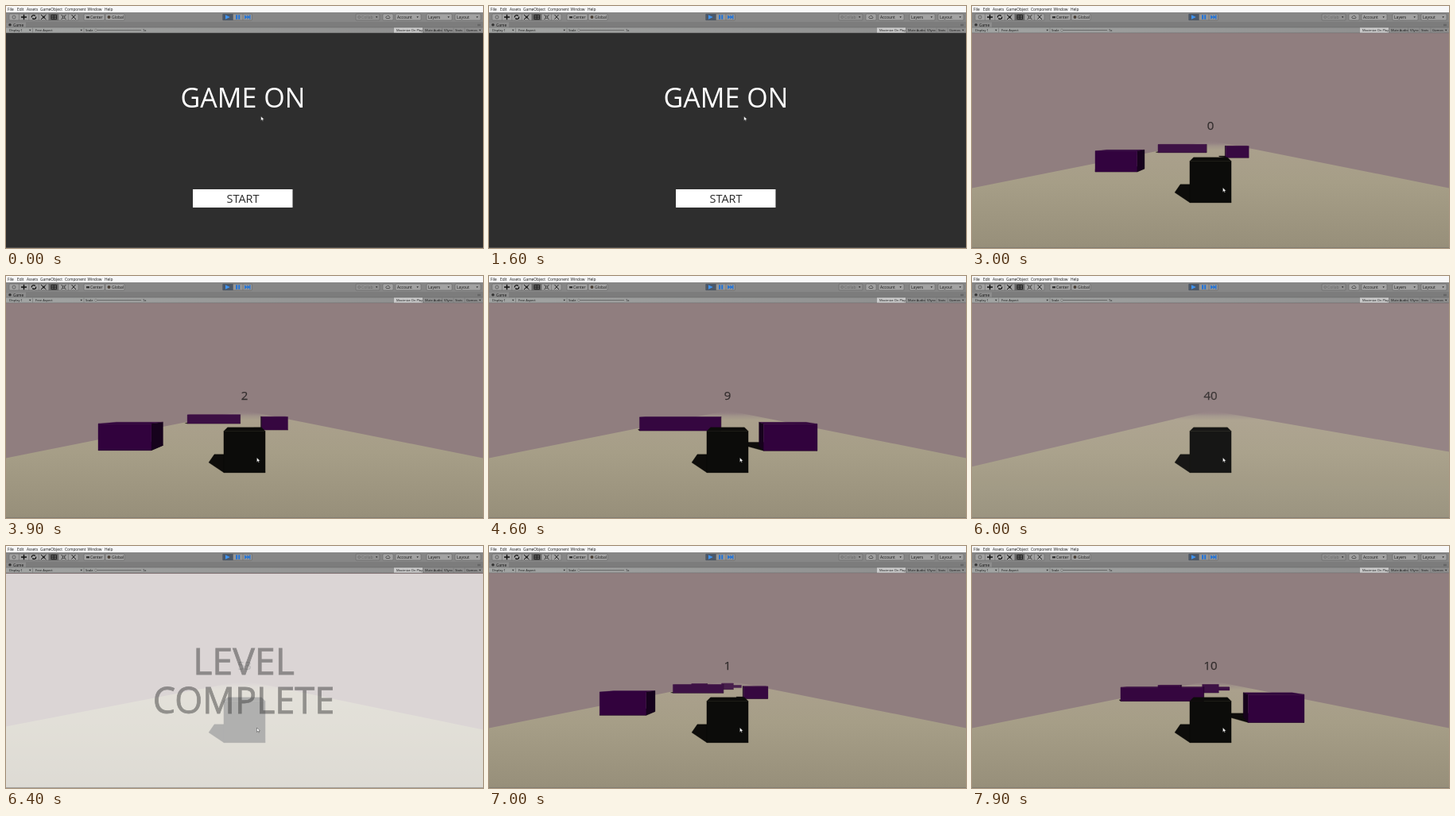
Recreate the animation shown at these times as an HTML page. Size 600 px wide and 305 px high, loop 8000 ms.

```html
<!DOCTYPE html>
<html lang="en">
<head>
<meta charset="utf-8">
<title>Cube runner</title>
<style>
  html, body { margin: 0; width: 100%; height: 100%; overflow: hidden; background: #2e2e2e; }
  svg { display: block; width: 100vw; height: 100vh; }
  text { font-family: "Open Sans", "Noto Sans", sans-serif; }
</style>
</head>
<body>
<svg viewBox="0 0 600 305">
  <defs>
    <linearGradient id="sand" gradientUnits="userSpaceOnUse" x1="0" y1="169.5" x2="0" y2="305">
      <stop offset="0" stop-color="#907e7f"/>
      <stop offset=".025" stop-color="#948283"/>
      <stop offset=".05" stop-color="#a09389"/>
      <stop offset=".09" stop-color="#aaa08c"/>
      <stop offset=".4" stop-color="#a69e87"/>
      <stop offset="1" stop-color="#978f7a"/>
    </linearGradient>
    <linearGradient id="bar">
      <stop offset="0" stop-color="#a2a4a3"/>
      <stop offset="1" stop-color="#8c8c8c"/>
    </linearGradient>
    <clipPath id="view"><rect y="34" width="600" height="271"/></clipPath>
  </defs>

  <g id="menu">
    <rect y="34" width="600" height="271" fill="#2e2e2e"/>
    <text x="298" y="128.3" font-size="34" fill="#fff" text-anchor="middle">GAME ON</text>
    <rect x="235" y="231" width="125.5" height="23" fill="#fff"/>
    <text x="298" y="248" font-size="14.5" fill="#2b2b2b" text-anchor="middle">START</text>
  </g>

  <g id="game" clip-path="url(#view)">
    <rect y="34" width="600" height="271" fill="#907e7f"/>
    <path id="ground" fill="url(#sand)"/>
    <g id="solids"></g>
    <text id="score" x="300" y="156" font-size="15" fill="#322d2d" stroke="#322d2d" stroke-width=".25" text-anchor="middle"></text>
    <rect id="veil" y="35" width="600" height="270" fill="#fff"/>
    <g id="done" fill="#323232" stroke="#323232" stroke-width=".8" text-anchor="middle">
      <text x="299" y="161.7" font-size="46.5">LEVEL</text>
      <text x="299" y="210.7" font-size="45">COMPLETE</text>
    </g>
  </g>

  <path d="M0 304.5H600" stroke="#6c6c6c" opacity=".5"/>
  <g id="chrome"></g>
  <path id="cursor" d="M0 0V5.5L1.3 4.3 2.2 6.2 3 5.8 2.2 4H4Z" fill="#fff" stroke="#222" stroke-width=".4"/>
</svg>

<script>
const $ = id => document.getElementById(id);
const LOOP = 8000, LEVEL_1 = 2800, LEVEL_2 = 6600, FADE = 5900;
const FOCAL = 234.7, HORIZON = 169.5, EYE = 2, FLOOR = 0.5, NEAR = 0.3;
const SKY = [144, 126, 127];
const SHADOW = { x: -0.53, z: 0.87 };

const clamp = (v, lo = 0, hi = 1) => Math.min(hi, Math.max(lo, v));
const smooth = u => { u = clamp(u); return u * u * (3 - 2 * u); };
const ease = (t, from, to) => smooth((t - from) / (to - from));

// ---- editor window ----
function buildChrome() {
  const rect = (x, y, w, h, fill, extra = '') =>
    `<rect x="${x}" y="${y}" width="${w}" height="${h}" fill="${fill}" ${extra}/>`;
  const label = (x, y, size, text, fill = '#141414') =>
    `<text x="${x}" y="${y}" font-size="${size}" fill="${fill}">${text}</text>`;
  const line = (d, color = '#1c1c1c', width = 1) =>
    `<path d="${d}" fill="none" stroke="${color}" stroke-width="${width}"/>`;
  const shape = (d, fill = '#222') => `<path d="${d}" fill="${fill}"/>`;
  const arrow = (x, y) => shape(`M${x} ${y}h2.4l-1.2 1.6z`);
  const button = (x, w, fill = '#a2a2a2') =>
    rect(x, 10, w, 8, fill, 'rx="1.2" stroke="#5c5c5c" stroke-width=".5"');

  let out = rect(0, 0, 600, 8, '#f8f8f8') + rect(0, 8, 600, 12, '#868686') +
    rect(0, 20, 600, 7, '#7c7c7c') + rect(0, 20.5, 25, 6.5, '#8c8c8c') +
    rect(0, 27, 600, 7, 'url(#bar)') + line('M0 27H600M0 33.8H600', '#666', 0.5);

  [[2, 'File'], [14, 'Edit'], [26, 'Assets'], [43, 'GameObject'], [74, 'Component'],
   [102.5, 'Window'], [124, 'Help']].forEach(([x, s]) => out += label(x, 5.8, 4.8, s));

  out += button(4, 87);
  for (let i = 1; i < 7; i++) out += line(`M${4 + i * 12.4} 10v8`, '#5c5c5c', 0.5);
  out += rect(54, 10, 12, 8, '#666') +
    `<circle cx="10" cy="14" r="2" fill="none" stroke="#555" stroke-width=".8"/>` +
    line('M19 14h7M22.5 10.8v6.4', '#111', 1.4) +
    line('M32.3 14.5a2.5 2.5 0 0 1 4.4-2M37.7 13.5a2.5 2.5 0 0 1-4.4 2', '#111', 1.2) +
    line('M44 11l6.500 6M50.5 11l-6.500 6', '#111', 1) + rect(45.9, 12.7, 2.8, 2.6, '#222') +
    line('M57 11.3h6.500v5.4h-6.500zM57 14h6.5M60.2 11.3v5.4', '#111', 0.8) +
    line('M69.5 11l6 6M75.5 11l-6 6', '#222', 0.9) +
    `<circle cx="72.5" cy="14" r="1.4" fill="#a2a2a2" stroke="#222" stroke-width=".7"/>` +
    line('M82.5 11l5.500 6M87.5 11l-5 5.5', '#222', 1);

  out += button(98, 26) + button(125, 24) + rect(101, 13, 4, 2.4, '#333') +
    `<circle cx="129.5" cy="14" r="2" fill="#4a4038"/>` +
    label(106, 15.8, 5, 'Center') + label(133, 15.8, 5, 'Global');

  out += button(272.5, 37, '#959595') + rect(272.5, 10, 13, 8, '#4c5868') +
    line('M285.5 10v8M298 10v8', '#5c5c5c', 0.5) +
    shape('M276 11.2l5.800 2.800-5.800 2.800z', '#3f93f0') +
    shape('M289.2 11.2h1.900v5.600h-1.900zM292.3 11.2h1.900v5.600h-1.900z', '#1c72dc') +
    shape('M300.2 11.2l3.200 2.800-3.200 2.800zM303.4 11.2l3.200 2.800-3.200 2.800zM306.2 11.2h1.300v5.600h-1.300z', '#1c72dc');

  out += button(440, 30, '#909090') + label(447, 15.8, 5, 'Collab', '#666') + arrow(465, 13.3) +
    `<circle cx="444.3" cy="14" r="1.5" fill="none" stroke="#666" stroke-width=".7"/>` +
    button(474, 13) + line('M478.5 15.5a1.2 1.2 0 0 1 .5-2.3a1.8 1.8 0 0 1 3.3.4a1 1 0 0 1 0 1.9z', '#333', 0.7) +
    button(490, 32) + label(492, 15.8, 5, 'Account') + arrow(516.5, 13.3) +
    button(529, 32) + label(531, 15.8, 5, 'Layers') + arrow(555.5, 13.3) +
    button(565, 32) + label(567, 15.8, 5, 'Layout') + arrow(591.5, 13.3);

  out += `<circle cx="5" cy="23.8" r="1.8" fill="#333"/>` + label(9, 25.6, 4.7, 'Game') +
    line('M593 23.3h4M593 24.7h4', '#444', 0.5);

  out += rect(488, 27.4, 36, 6.2, '#cacaca') +
    line('M33.5 27.5v6M98 27.5v6M524.5 27.5v6M548.5 27.5v6M563 27.5v6M577 27.5v6', '#6c6c6c', 0.5) +
    line('M112 30.5H170', '#555', 0.7) +
    `<circle cx="113" cy="30.5" r="1.3" fill="#bbb" stroke="#444" stroke-width=".4"/>`;
  [[4, 'Display 1'], [37, 'Free Aspect'], [100, 'Scale'], [172, '1x'], [491, 'Maximize On Play'],
   [527, 'Mute Audio'], [551, 'VSync'], [565, 'Stats'], [579, 'Gizmos']]
    .forEach(([x, s]) => out += label(x, 31.9, 4, s));
  out += arrow(29, 29.8) + arrow(93.5, 29.8) + arrow(595, 29.8);
  $('chrome').innerHTML = out;
}

// ---- 3D scene ----
const block = (x0, x1, z, y0 = FLOOR, y1 = 1.5) => ({ x0, x1, y0, y1, z0: z, z1: z + 1,
  front: [48, 0, 60], side: [20, 0, 27] });
const FIRST = [block(-5.5, -3.5, 8.9), block(-6.5, -0.5, 23.1), block(1.34, 3.34, 16.25)];
const SECOND = [...FIRST, block(-1, 1, 32.3), block(-5.35, -3.1, 28.6), block(1, 2.42, 33.3, 0.74, 1.14)];
const PLAYER = { ...block(-0.5, 0.5, 4.5), front: [11, 11, 9] };

function project(x, y, z) {
  const k = FOCAL / Math.max(z, NEAR);
  return `${(300 + x * k).toFixed(2)},${(HORIZON + (EYE - y) * k).toFixed(2)}`;
}

// The thin stroke closes the seams between faces of one colour.
function polygon(points, color, depth) {
  const fog = 1 - Math.exp(-((depth * 0.017) ** 2));
  const rgb = `rgb(${color.map((c, i) => Math.round(c + (SKY[i] - c) * fog))})`;
  return `<polygon points="${points.map(p => project(...p)).join(' ')}" fill="${rgb}" stroke="${rgb}" stroke-width=".3"/>`;
}

function castShadow({ x0, x1, y0, z0, z1 }) {
  if (y0 > FLOOR) return '';
  const sx = SHADOW.x, sz = SHADOW.z;
  const outline = [[x0, z0], [x0 + sx, z0 + sz], [x0 + sx, z1 + sz], [x1 + sx, z1 + sz], [x1, z1], [x1, z0]];
  return polygon(outline.map(([x, z]) => [x, FLOOR, z]), [12, 11, 9], z0);
}

function solid({ x0, x1, y0, y1, z0, z1, front, side }) {
  let out = polygon([[x0, y1, z0], [x0, y1, z1], [x1, y1, z1], [x1, y1, z0]], front, z0);
  const x = x0 > 0 ? x0 : x1 < 0 ? x1 : null;
  if (x !== null) out += polygon([[x, y1, z0], [x, y1, z1], [x, y0, z1], [x, y0, z0]], side, z0);
  if (z0 > NEAR) out += polygon([[x0, y0, z0], [x0, y1, z0], [x1, y1, z0], [x1, y0, z0]], front, z0);
  return out;
}

function drawScene(blocks, travel, shift) {
  const edge = x => HORIZON + 300 * (EYE - FLOOR) / x;
  const left = edge(7.5 + shift), right = edge(7.5 - shift);
  $('ground').setAttribute('d', `M300 ${HORIZON}L0 ${left}V305H600V${right}Z`);

  const placed = blocks.map(b => ({ ...b, x0: b.x0 - shift, x1: b.x1 - shift,
    z0: b.z0 - travel, z1: b.z1 - travel })).filter(b => b.z1 > NEAR);
  const all = [...placed, PLAYER].sort((a, b) => b.z0 - a.z0);
  $('solids').innerHTML = all.map(castShadow).join('') + all.map(solid).join('');
  $('score').textContent = Math.round(travel);
}

const distance = ms => 9.3 * (Math.max(0, ms) / 1250) ** 1.948;

function render(t) {
  const playing = t >= LEVEL_1, second = t >= LEVEL_2;
  $('menu').style.display = playing ? 'none' : '';
  $('game').style.display = playing ? '' : 'none';

  if (playing) {
    const travel = second ? distance(t - 6630) : distance(t - 3350);
    const shift = second ? 0 : -1.15 * ease(t, 5150, 5900) + 1.4 * ease(t, 6020, 6400);
    drawScene(second ? SECOND : FIRST, travel, shift);
    $('veil').setAttribute('opacity', second ? 0 : ease(t, FADE, FADE + 810));
    $('done').setAttribute('opacity', second ? 0 : clamp((t - 6100) / 660));
  }

  const move = ease(t, 1950, 2650);
  const x = 320.7 - 5.2 * move + 5 * Math.sin(Math.PI * move);
  $('cursor').setAttribute('transform', `translate(${x} ${139 + 90 * move})`);
}

buildChrome();
const start = performance.now();
function tick() {
  render((performance.now() - start) % LOOP);
  requestAnimationFrame(tick);
}
tick();
</script>
</body>
</html>
```
